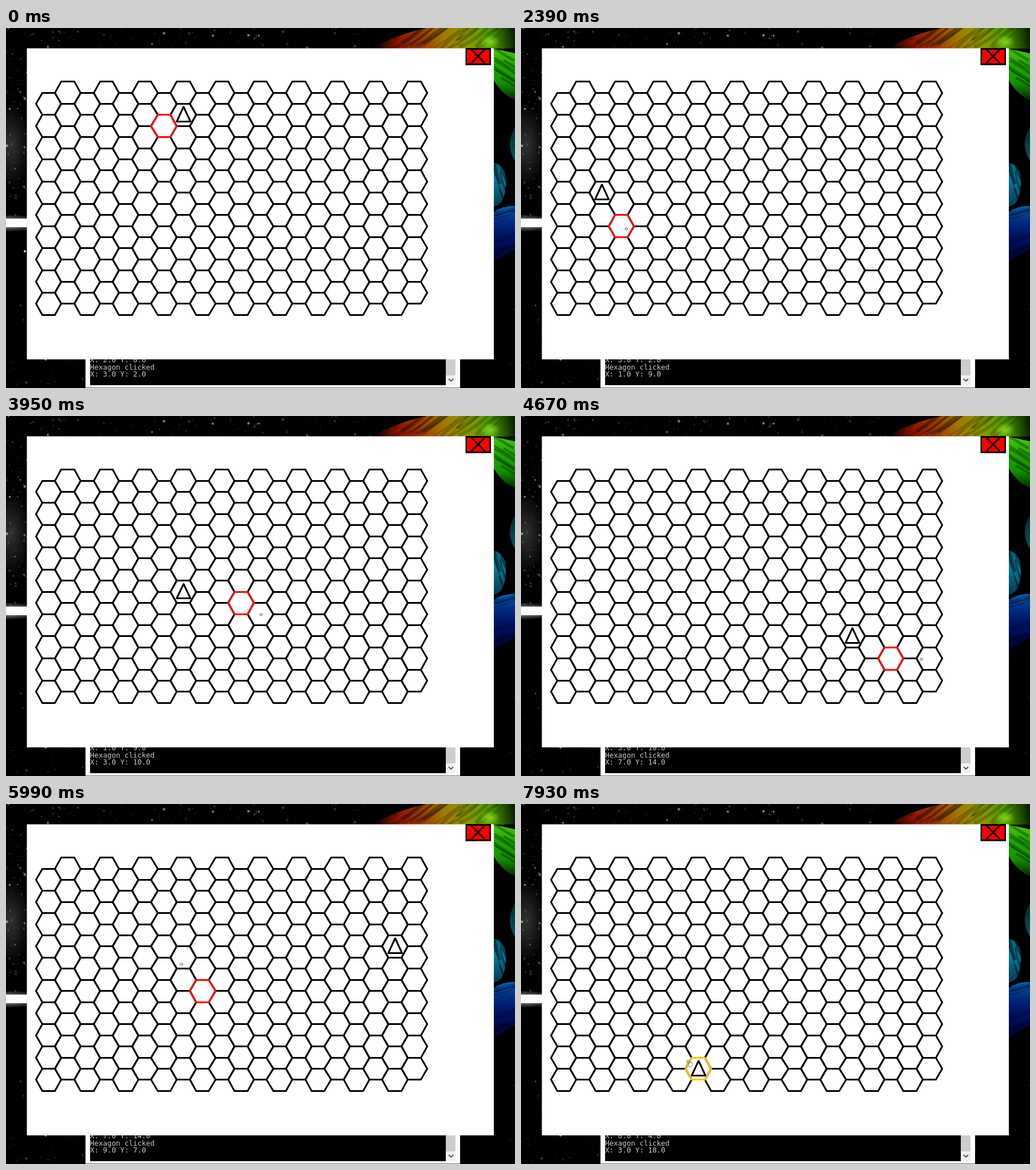
An HTML page with a canvas for the animation above (8000 ms loop, 890 px wide and 629 px high).

```html
<!DOCTYPE html>
<html>
<head>
<meta charset="utf-8">
<style>
  html, body { margin: 0; height: 100%; overflow: hidden; background: #000; }
  canvas { display: block; }
</style>
</head>
<body>
<canvas id="stage" width="890" height="629"></canvas>
<script>
const LOOP = 8000, RADIUS = 22.43, HALF = 19.42;
const ctx = document.getElementById('stage').getContext('2d');
const backdrop = document.createElement('canvas');
backdrop.width = 890;
backdrop.height = 629;

// Turning points of the pointer: time, x, y
const path = [
  [0, 33, 390], [120, 49, 368], [290, 72, 364], [910, 140, 290], [1030, 147, 292],
  [2030, 147, 292], [2390, 184, 351], [2630, 297, 318], [3110, 305, 298],
  [3230, 303, 287], [3350, 282, 275], [3590, 312, 308], [4310, 580, 386],
  [4670, 700, 425], [4790, 716, 370], [5030, 682, 250], [5510, 545, 402],
  [5870, 352, 330], [5990, 307, 280], [6230, 312, 268], [6830, 518, 187],
  [6950, 515, 188], [7550, 345, 478], [7790, 296, 455], [7930, 292, 450]
];
const clickTimes = [2030, 3230, 4430, 5150, 6230, 6950, 7930];

// The scene advances in discrete ticks
const ticks = [0, 120, 290];
for (let t = 430; t <= 1030; t += 120) ticks.push(t);
for (let t = 2030; t <= 7790; t += 120) ticks.push(t);
ticks.push(7930);

const cell = (X, Y) => ({ X, Y, x: 74.5 + 33.65 * (2 * X + (Y + 1) % 2), y: 113 + HALF * Y });
const cells = [];
for (let Y = 0; Y < 20; Y++) for (let X = 0; X < 10; X++) cells.push(cell(X, Y));
const cellAt = (X, Y) => cells[Y * 10 + X];

function pointerAt(t) {
  const i = path.findIndex(p => p[0] >= t);
  if (i < 1) return { x: path[0][1], y: path[0][2] };
  const [a, b] = [path[i - 1], path[i]], k = (t - a[0]) / (b[0] - a[0]);
  return { x: a[1] + (b[1] - a[1]) * k, y: a[2] + (b[2] - a[2]) * k };
}

// The game reacts to where the pointer was one tick earlier
function trailingPointer(time) {
  const i = ticks.indexOf(time);
  return i ? pointerAt(ticks[i - 1]) : cellAt(3, 3);
}

function cellUnder(p) {
  const distance = c => Math.hypot(c.x - p.x, c.y - p.y);
  const best = cells.reduce((a, b) => distance(b) < distance(a) ? b : a);
  return distance(best) < 30 ? best : null;
}

const moves = [
  { time: -2000, cell: cellAt(2, 0) },
  { time: -1000, cell: cellAt(3, 2) },
  ...clickTimes.map(time => {
    const at = trailingPointer(time);
    return { time, at, cell: cellUnder(at) };
  })
];

function poly(g, points, stroke, width, fill) {
  g.beginPath();
  points.forEach(([x, y]) => g.lineTo(x, y));
  g.closePath();
  if (fill) { g.fillStyle = fill; g.fill(); }
  g.strokeStyle = stroke;
  g.lineWidth = width;
  g.stroke();
}

const snap = v => Math.floor(v) + 0.5;

function hexagon(g, c, color) {
  const r = RADIUS / 2;
  poly(g, [[-RADIUS, 0], [-r, -HALF], [r, -HALF], [RADIUS, 0], [r, HALF], [-r, HALF]]
    .map(([x, y]) => [snap(c.x + x), snap(c.y + y)]), color, 3);
}

function box(g, x, y, w, h, color) {
  g.fillStyle = color;
  g.fillRect(x, y, w, h);
}

function paintSpace(g) {
  let seed = 11;
  const random = () => (seed = seed * 16807 % 2147483647) / 2147483647;

  function gradient(x0, y0, x1, y1, ...colors) {
    const fade = g.createLinearGradient(x0, y0, x1, y1);
    colors.forEach((c, i) => fade.addColorStop(i / (colors.length - 1), c));
    return fade;
  }
  function glow(x, y, rx, ry, rgb, alpha) {
    g.save();
    g.translate(x, y);
    g.scale(rx, ry);
    const fade = g.createRadialGradient(0, 0, 0, 0, 0, 1);
    fade.addColorStop(0, `rgba(${rgb},${alpha})`);
    fade.addColorStop(1, `rgba(${rgb},0)`);
    box(g, -1, -1, 2, 2, fade);
    g.restore();
  }
  function stars(count, x, y, w, h) {
    for (let i = 0; i < count; i++) {
      const size = 0.4 + random() ** 8 * 2, v = 25 + 130 * random() ** 2 | 0;
      g.fillStyle = `rgb(${v},${v},${v})`;
      g.beginPath();
      g.arc(x + random() * w, y + random() * h, size, 0, 7);
      g.fill();
    }
  }
  // Fills a shape, then streaks it with soft curves along (dx, dy)
  function smoke(shape, fill, streak, count, x, y, w, h, dx, dy) {
    const area = new Path2D(shape);
    g.save();
    g.clip(area);
    g.fillStyle = fill;
    g.fill(area);
    g.strokeStyle = streak;
    for (let i = 0; i < count; i++) {
      const sx = x + random() * w, sy = y + random() * h, bend = 8 - random() * 16;
      g.lineWidth = 1 + random() * 6;
      g.beginPath();
      g.moveTo(sx, sy);
      g.quadraticCurveTo(sx + dx / 2 + bend, sy + dy / 2 + bend, sx + dx, sy + dy);
      g.stroke();
    }
    g.restore();
  }

  box(g, 0, 0, 890, 629, '#000');
  glow(8, 205, 36, 75, '110,110,110', 0.45);
  stars(230, 0, 0, 640, 36);
  stars(260, 0, 36, 37, 300);
  stars(30, 0, 350, 37, 229);
  stars(60, 0, 579, 139, 50);
  stars(20, 794, 410, 96, 219);
  glow(0, 341, 75, 15, '255,255,255', 0.8);
  box(g, 0, 333, 37, 15, '#fff');

  smoke('M640 36 Q680 12 735 0 H890 V36Z',
    gradient(645, 36, 885, 0, '#000', '#8a1200', '#a03a00', '#a07800', '#8a9a00', '#4e9c00', '#0a2500'),
    'rgba(0,0,0,.2)', 24, 640, 20, 190, 25, 60, -45);
  glow(846, 24, 18, 12, '150,235,40', 0.75);
  smoke('M853 36 L890 44 V126 Q869 118 853 92Z',
    gradient(0, 36, 0, 126, '#49c510', '#1fa500', '#159000', '#022600'),
    'rgba(0,30,0,.35)', 12, 840, 30, 30, 80, 40, 25);
  smoke('M853 235 Q876 240 874 275 T853 312Z M890 172 Q872 205 890 232Z',
    gradient(0, 172, 0, 312, '#012a2c', '#034b55', '#067a98', '#023a50'),
    'rgba(0,0,0,.45)', 8, 845, 165, 25, 130, 12, 40);
  smoke('M853 321 Q872 309 890 311 V386 L853 409Z',
    gradient(0, 310, 0, 408, '#0064ac', '#003084', '#001566', '#000a50', '#000328'),
    'rgba(0,0,25,.25)', 8, 840, 320, 20, 80, 50, -15);
}

function paintBackdrop(g) {
  paintSpace(g);

  box(g, 139, 579, 655, 50, '#fff');
  box(g, 147, 579, 622, 45, '#000');
  box(g, 769, 579, 17, 45, '#f0f0f0');
  box(g, 769, 579, 17, 28, '#cdcdcd');
  g.strokeStyle = '#505050';
  g.lineWidth = 1.8;
  g.stroke(new Path2D('M774 613l4 4l4 -4'));
  box(g, 139, 628, 655, 1, '#777');

  box(g, 36.5, 35.5, 816.5, 543.5, '#fff');
  cells.forEach(c => hexagon(g, c, '#000'));

  box(g, 803.5, 35, 44.5, 30, '#000');
  box(g, 806, 38, 39.5, 24, '#f00');
  g.strokeStyle = '#000';
  g.lineWidth = 3;
  g.stroke(new Path2D('M814 38L837 61M837 38L814 61'));
}

function paintConsole(previous, current) {
  const line = ({ cell }) => `X: ${cell.X}.0 Y: ${cell.Y}.0`;
  ctx.save();
  ctx.beginPath();
  ctx.rect(147, 579, 622, 45);
  ctx.clip();
  ctx.font = '12.5px "DejaVu Sans Mono", monospace';
  ctx.fillStyle = '#ccc';
  ctx.fillText(line(previous), 147, 584);
  ctx.fillText('Hexagon clicked', 147, 597);
  ctx.fillText(line(current), 147, 609);
  ctx.restore();
}

function draw(now) {
  const t = now % LOOP;
  const time = ticks.findLast(v => v <= t);
  const last = moves.findLastIndex(m => m.time <= time), move = moves[last];
  const hover = cellUnder(trailingPointer(time));

  ctx.drawImage(backdrop, 0, 0);
  paintConsole(moves[last - 1], move);
  if (hover) hexagon(ctx, hover, hover === move.cell ? '#ffc800' : '#f00');

  const { x, y } = move.cell;
  ctx.lineJoin = 'round';
  poly(ctx, [[x, y - 14.2], [x + 12, y + 11.6], [x - 12, y + 11.6]]
    .map(p => p.map(snap)), '#000', 3);
  ctx.lineJoin = 'miter';

  if (time - move.time < 240) {
    ctx.strokeStyle = '#888';
    ctx.lineWidth = 1;
    ctx.beginPath();
    ctx.arc(move.at.x, move.at.y, 4, 0, 7);
    ctx.stroke();
  }
  const p = pointerAt(time);
  poly(ctx, [[p.x, p.y - 2.5], [p.x + 2.5, p.y], [p.x, p.y + 2.5], [p.x - 2.5, p.y]],
    '#333', 1, '#fff');
}

paintBackdrop(backdrop.getContext('2d'));
const start = performance.now();
function frame() {
  draw(performance.now() - start);
  requestAnimationFrame(frame);
}
frame();
</script>
</body>
</html>
```
